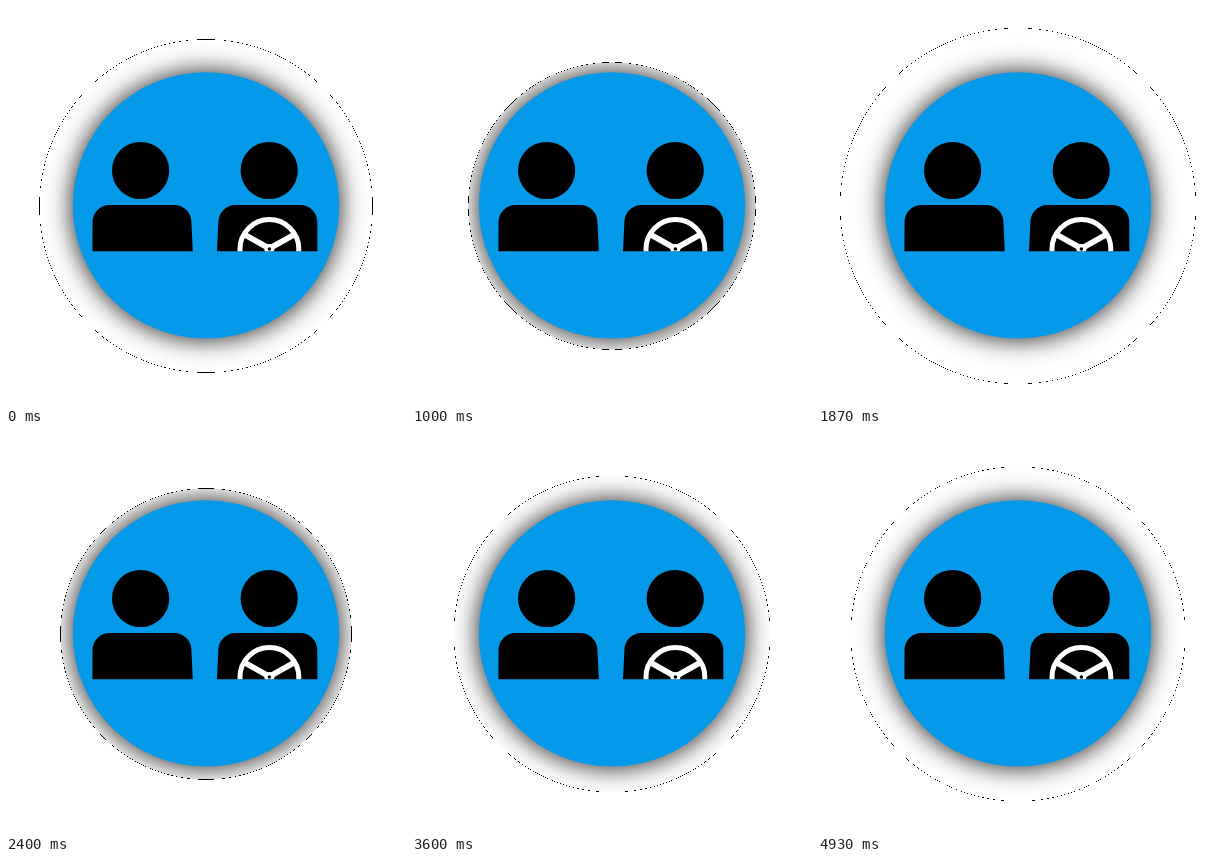
An HTML page with a canvas that plays this animation: 400x400 px, repeating every 4.99 s.

```html
<!DOCTYPE html>
<html lang="en">
<head>
<meta charset="utf-8">
<title>Passenger and driver</title>
<style>
html, body { margin: 0; width: 100%; height: 100%; overflow: hidden; background: #fff; }
canvas { display: block; width: 400px; height: 400px; }
</style>
</head>
<body>
<canvas id="stage" width="400" height="400"></canvas>
<script>
const ctx = document.getElementById('stage').getContext('2d');
const LOOP = 4990, STEP = 200 / 3, STEPS = 75;
const BEAT = 22, PEAK = 4, FALL = 13;
const LOW = 142, HIGH = 190.3;
const DISC = 133.2, BLUE = '#0499e9', FLOOR = 245.3;
const SHADOW = 0.43, SPREAD = 12.5, REACH = 58;

// One beat: a decelerating fall, then a smooth rise back to the peak
function glowRadius(step) {
  const k = (step - PEAK + BEAT) % BEAT;
  const rise = n => 1 - Math.cos(Math.PI * n / (BEAT - FALL + 1));
  const level = k < FALL
    ? Math.pow(1 - k / FALL, 1.75)
    : rise(k - FALL) / rise(BEAT - FALL);
  return LOW + (HIGH - LOW) * level;
}

function circle(x, y, r, fill) {
  ctx.beginPath();
  ctx.arc(x, y, r, 0, Math.PI * 2);
  ctx.fillStyle = fill;
  ctx.fill();
}

// Soft shadow of the disc, fixed in place and cut off by the moving circle
const shadow = ctx.createRadialGradient(200, 199.7, DISC, 200, 199.7, DISC + REACH);
for (let i = 0; i <= 24; i++) {
  const z = i / 24 * REACH / SPREAD;
  const a = SHADOW * Math.exp(-0.717 * z - 0.416 * z * z);
  shadow.addColorStop(i / 24, `rgba(0,0,0,${a.toFixed(4)})`);
}

// Hairline of unsmoothed pixels, broken up along the curve
function hairline(r) {
  ctx.fillStyle = '#000';
  const inner = r - 0.3;
  for (let y = 0.5; y < r; y++) {
    const far = Math.sqrt(r * r - y * y);
    const near = y < inner ? Math.sqrt(inner * inner - y * y) : 0;
    for (let x = Math.ceil(near - 0.5) + 0.5; x <= far; x++) {
      for (const px of [199.5 + x, 199.5 - x]) {
        for (const py of [199.5 + y, 199.5 - y]) ctx.fillRect(px, py, 1, 1);
      }
    }
  }
}

function person(x, side) {
  circle(x, 164.5, 28.6, '#000');
  ctx.save();
  ctx.translate(x, 0);
  ctx.scale(side, 1);
  ctx.beginPath();
  ctx.moveTo(-48.2, FLOOR);
  ctx.arcTo(-48, 199, 0, 199, 17);
  ctx.arcTo(50, 199, 52.2, FLOOR, 17);
  ctx.lineTo(52.2, FLOOR);
  ctx.closePath();
  ctx.fill();
  ctx.restore();
}

function wheel(x, y) {
  ctx.save();
  ctx.beginPath();
  ctx.rect(x - 40, y - 40, 80, FLOOR - y + 40);
  ctx.clip();
  ctx.strokeStyle = '#fff';
  ctx.lineWidth = 5;
  ctx.beginPath();
  ctx.arc(x, y, 29.4, 0, Math.PI * 2);
  ctx.stroke();
  ctx.lineWidth = 5.8;
  ctx.beginPath();
  for (const s of [-1, 1]) {
    ctx.moveTo(x, y - 0.5);
    ctx.lineTo(x + s * 25, y - 14.5);
  }
  ctx.stroke();
  circle(x, y, 5, '#fff');
  circle(x, y, 1.8, '#000');
  ctx.restore();
}

function draw(ms) {
  const step = Math.min(STEPS - 1, Math.floor((ms % LOOP + 3.34) / STEP));
  const r = glowRadius(step);
  ctx.fillStyle = '#fff';
  ctx.fillRect(0, 0, 400, 400);
  circle(200, 200, r, shadow);
  hairline(r);
  circle(200, 199.4, DISC, BLUE);
  person(134.6, 1);
  person(263.2, -1);
  wheel(263.4, 243);
}

let start;
function tick(now) {
  if (start === undefined) start = now;
  draw(now - start);
  requestAnimationFrame(tick);
}
draw(0);
requestAnimationFrame(tick);
</script>
</body>
</html>
```
